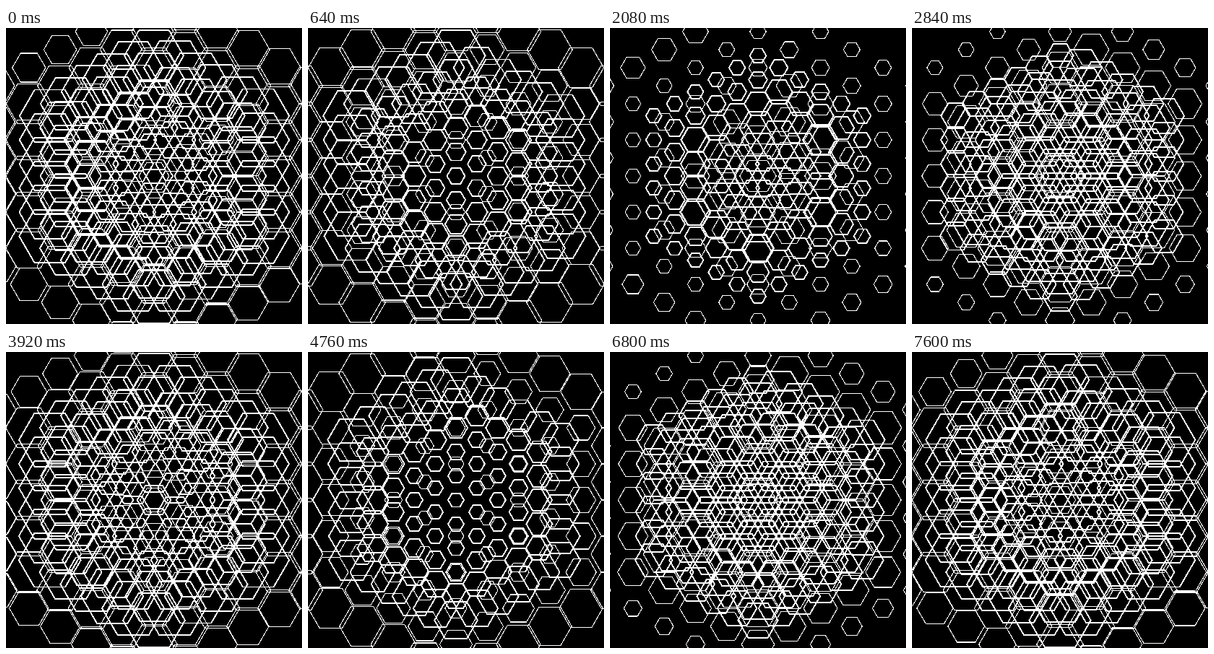
An HTML page that plays this animation: 410 px wide and 410 px high, repeating every 7.64 s.

```html
<!DOCTYPE html>
<html lang="en">
<head>
<meta charset="utf-8">
<title>Hexagon waves</title>
<style>
html, body { margin: 0; width: 100%; height: 100%; overflow: hidden; background: #000; }
svg { display: block; }
path { fill: none; stroke: #fff; shape-rendering: crispEdges; }
</style>
</head>
<body>
<svg width="410" height="410">
  <path id="wide" stroke-width="1.1"/>
  <path id="tight" stroke-width="1.9"/>
</svg>
<script>
const CENTER = 205, LOOP = 7640, STEP = 40, RINGS = 5;
const DEG = Math.PI / 180;
const MIN_RADIUS = 10.9, LEAD = 3.5 * DEG;

// Cells in spiral order: each ring runs clockwise and ends at its top corner.
function spiral(gap) {
  const cells = [[CENTER, CENTER]];
  for (let ring = 1; ring <= RINGS; ring++) {
    let x = CENTER, y = CENTER - ring * gap;
    for (let side = 0; side < 6; side++) {
      const a = (30 + 60 * side) * DEG;
      for (let k = 0; k < ring; k++) {
        x += gap * Math.cos(a);
        y += gap * Math.sin(a);
        cells.push([x, y]);
      }
    }
  }
  return cells;
}

// A tighter grid swings further and passes the wave on faster.
function makeLayer(id, gap) {
  return {
    path: document.getElementById(id),
    cells: spiral(gap),
    swing: 535 / gap,
    lag: gap * 0.0408 * DEG
  };
}

const layers = [makeLayer('wide', 50), makeLayer('tight', 100 / 3)];

function hexagon(x, y, r) {
  const points = [0, 1, 2, 3, 4, 5].map(k => {
    const a = k * 60 * DEG;
    return (x + r * Math.cos(a)).toFixed(2) + ' ' + (y + r * Math.sin(a)).toFixed(2);
  });
  return 'M' + points.join('L') + 'Z';
}

function draw(time) {
  const t = Math.floor((time % LOOP) / STEP) * STEP;
  const phase = 4 * Math.PI * t / LOOP + LEAD;
  for (const { path, cells, swing, lag } of layers) {
    const d = cells.map(([x, y], i) =>
      hexagon(x, y, MIN_RADIUS + swing * (1 - Math.sin(phase - i * lag))));
    path.setAttribute('d', d.join(''));
  }
}

const start = performance.now();
function tick() {
  draw(performance.now() - start);
  requestAnimationFrame(tick);
}
tick();
</script>
</body>
</html>
```
